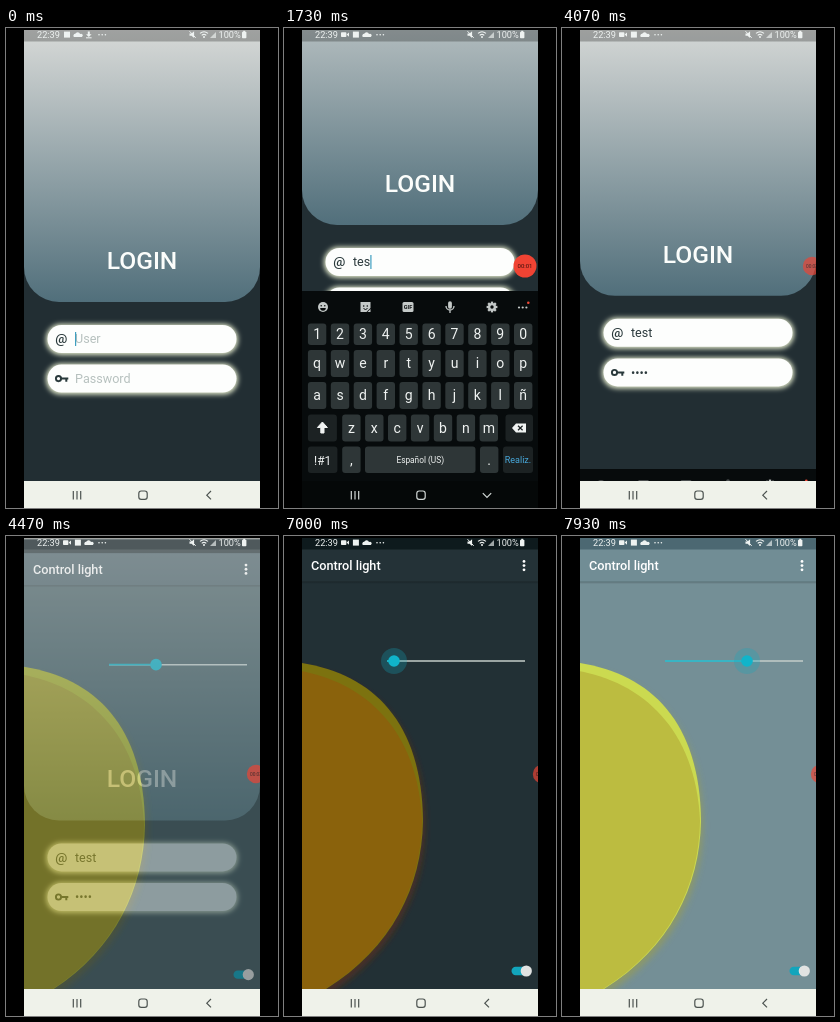
These frames come from a looping animation (272x480 px, 8000 ms). An HTML page:

```html
<!DOCTYPE html>
<html lang="es">
<head>
<meta charset="utf-8">
<title>Control light</title>
<style>
  html, body { margin: 0; width: 100%; height: 100%; overflow: hidden; background: #000; }
  svg { display: block; width: 100%; height: 100%; font-family: Roboto, sans-serif; }
</style>
</head>
<body>
<svg id="stage" viewBox="0 0 272 480"></svg>
<script>
const LOOP = 8000;
const stage = document.getElementById('stage');
const $ = id => document.getElementById(id);
const set = (id, attrs) => { for (const k in attrs) $(id).setAttribute(k, attrs[k]); };
const show = (id, on) => set(id, { visibility: on ? 'visible' : 'hidden' });
const clamp = x => Math.max(0, Math.min(1, x));

// ---------- markup helpers ----------
const rect = (x, y, w, h, fill, r = 0, more = '') =>
  `<rect x="${x}" y="${y}" width="${w}" height="${h}" rx="${r}" fill="${fill}" ${more}/>`;
const dot = (x, y, r, fill, more = '') => `<circle cx="${x}" cy="${y}" r="${r}" fill="${fill}" ${more}/>`;
const line = (d, color, w = 1, more = '') =>
  `<path d="${d}" fill="none" stroke="${color}" stroke-width="${w}" ${more}/>`;
const shape = (d, fill, more = '') => `<path d="${d}" fill="${fill}" ${more}/>`;
const text = (x, y, size, fill, str, more = '') =>
  `<text x="${x}" y="${y}" font-size="${size}" fill="${fill}" ${more}>${str}</text>`;
const at = (x, y, body, more = '') => `<g transform="translate(${x} ${y})" ${more}>${body}</g>`;
const MID = 'text-anchor="middle"';
const BOLD = 'font-weight="500"';

// ---------- login page ----------
const INK = '#29393b';
const keyIcon = dot(52.5, 0, 2.6, 'none', `stroke="${INK}" stroke-width="1.9"`) +
  line('M55 0H62.3M60.3 0V3.2', INK, 2);
const atIcon = text(55.3, 4.2, 13.5, INK, '@', `${MID} ${BOLD}`);

const field = (id, y, icon, hint) => at(0, y,
  rect(40, -15, 192, 31, '#e6edcf', 15, 'filter="url(#glow)"') +
  rect(41.5, -14, 189, 28, '#fdfefd', 14) + icon +
  text(69, 4.4, 12.6, '#b7c1bf', hint, `id="${id}Hint"`) +
  text(69, 4.4, 12.6, '#2b393c', '', `id="${id}Text"`) +
  rect(69, -7, 1.2, 14, '#3f9fc0', 0, `id="${id}Caret"`));

const login =
  rect(18, 0, 236, 453, '#222e33') +
  `<g id="scroll">` +
  shape('M18 -20H254V239A35 35 0 0 1 219 274H53A35 35 0 0 1 18 239Z', 'url(#sky)') +
  text(136, 240.8, 24.6, '#fbfdfb', 'LOGIN', `${MID} ${BOLD}`) +
  field('user', 311, atIcon, 'User') +
  field('pass', 350.6, keyIcon, 'Password') + `</g>` +
  rect(18, 0, 236, 13.5, '#000', 0, 'opacity=".26"');

// ---------- light page ----------
const SUN = 'M10 126C85 135 138 182 139 285C138 350 108 412 42 453H10Z';
const CORE = 'M10 134C76 143 134 190 138 285C137 350 107 412 41 453H10Z';
const light =
  rect(18, 0, 236, 600, '#435a5f', 0, 'id="wall"') +
  `<g filter="url(#soft)">${shape(SUN, '#8a6410', 'id="shade" opacity=".55" transform="translate(2 5)"')}</g>` +
  shape(SUN, '#aaac24', 'id="rim"') + shape(CORE, '#a39720', 'id="core" filter="url(#edge)"') +
  rect(18, 45, 236, 3, 'url(#drop)') +
  rect(18, 0, 236, 45.5, '#435a5f', 0, 'id="bar"') +
  rect(18, 0, 236, 13.5, '#18262a', 0, 'id="top"') +
  text(27, 34, 12.7, '#fff', 'Control light', BOLD) +
  [25.4, 29.6, 33.8].map(y => dot(240, y, 1.4, '#fff')).join('') +
  line('M103 125H241', '#c3cdc9', 1.5) +
  line('M103 125H145', '#12b2c6', 1.7, 'id="active"') +
  dot(145, 125, 13, '#12a9bd', 'id="halo"') + dot(145, 125, 5.8, '#10b4ca', 'id="thumb"') +
  rect(227.5, 430.8, 17, 8.4, '#12a5bc', 4.2) + dot(242.3, 435, 5.6, '#e1e3e2');

// ---------- keyboard ----------
const key = (x, y, w, h, label, o = {}) =>
  rect(x, y, w, h, o.fill || '#2e3637', 3, o.id ? `id="${o.id}"` : '') +
  text(x + w / 2, y + h / 2 + (o.dy || 4.8), o.size || 14, o.ink || '#f0f3f2', label, MID);
const row = (chars, x, y, h) => [...chars].map((c, i) =>
  key(x + i * 22.9, y, 18.4, h, c, { id: 'key-' + c })).join('');

const GREY = '#c4c9c8';
const gear = [0, 45, 90, 135].map(a => line('M0 -5.4V5.4', GREY, 2.3, `transform="rotate(${a})"`)).join('') +
  dot(0, 0, 4, GREY) + dot(0, 0, 1.7, '#080c0d');
const tools = `<g id="tools">` +
  at(39, 279, dot(0, 0, 5, GREY) + dot(-1.8, -1.3, .8, '#080c0d') + dot(1.8, -1.3, .8, '#080c0d') +
    shape('M-2.8 1H2.8A2.8 2.8 0 0 1 -2.8 1Z', '#080c0d')) +
  at(81.5, 279, shape('M-5 -5H5V1L1 5H-5Z', GREY) + dot(-1.8, -1, .8, '#080c0d') + dot(1.8, -1, .8, '#080c0d') +
    line('M-2 1.5Q0 3.5 2 1.5', '#080c0d') + shape('M2 5L5 2V5Z', GREY)) +
  at(124, 279, rect(-5.5, -5, 11, 10, GREY, 1.5) + text(0, 2, 5.5, '#080c0d', 'GIF', `${MID} font-weight="700"`)) +
  at(166, 279, rect(-1.9, -5.8, 3.8, 7.6, GREY, 1.9) + line('M-4 -1A4 4 0 0 0 4 -1M0 3V6', GREY, 1.3)) + `</g>` +
  at(208, 279, gear) +
  [235, 238.7, 242.4].map(x => dot(x, 279.5, 1.1, GREY)).join('') + dot(244.3, 274.8, 1.3, '#ef4836');

const DARK = { fill: '#1c2223' };
const keyboard = rect(18, 263, 236, 220, '#070b0c') + tools +
  row('1234567890', 23.9, 295.5, 21.5) +
  row('qwertyuiop', 23.9, 322, 27) +
  row('asdfghjklñ', 23.9, 354, 27) +
  key(23.9, 386.5, 29, 27, '', DARK) +
  line('M36.8 405V399.5H33.4L38.4 394L43.4 399.5H40V405Z', '#f0f3f2', 1, 'style="fill:#f0f3f2"') +
  row('zxcvbnm', 58.2, 386.5, 27) +
  key(221.5, 386.5, 27.5, 27, '', DARK) +
  shape('M228 400L232 395.5H242V404.5H232Z', '#f0f3f2') + line('M234 397.8L238.6 402.3M238.6 397.8L234 402.3', '#1c2223', 1.2) +
  key(23.9, 418.5, 29.5, 26.5, '!#1', { ...DARK, size: 12 }) +
  key(58.2, 418.5, 18.4, 26.5, ',') +
  key(81, 418.5, 110.5, 26.5, 'Español (US)', { size: 8.3, dy: 3 }) +
  key(196, 418.5, 18.4, 26.5, '.') +
  key(219, 418.5, 30, 26.5, 'Realiz.', { ...DARK, size: 9, dy: 3.2, ink: '#48a9dc', id: 'done' });

// ---------- system bars ----------
const PALE = '#eef2f1';
const square = rect(-3, -3, 6, 6, PALE);
const cloud = shape('M-4 2.4A1.9 1.9 0 0 1 -2.6 -.8A2.6 2.6 0 0 1 2.2 -.6A1.6 1.6 0 0 1 4 2.4Z', PALE);
const camera = rect(-4, -2.4, 5.4, 4.8, PALE, .8) + shape('M1.6 0L4 -2.2V2.2Z', PALE);
const download = shape('M-1 -3H1V-.4H2.8L0 2.3L-2.8 -.4H-1Z', PALE) + line('M-2.8 3.2H2.8', PALE);
const icons = list => list.map((body, i) => at(61 + i * 10.9, 6.6, body)).join('');
const status = text(31, 10, 9.2, PALE, '22:39') +
  `<g id="before">${icons([square, cloud, download])}</g><g id="after">${icons([camera, square, cloud])}</g>` +
  [93, 96.2, 99.4].map(x => dot(x, 6.8, .8, PALE)).join('') +
  at(186.5, 6.6, shape('M-3 -1.2H-1L1.6 -3.4V3.4L-1 1.2H-3Z', PALE) + line('M-3 -3.4L3.2 3.2', PALE)) +
  at(198, 6.6, line('M-4 -1.2Q0 -4.6 4 -1.2M-2.3 .8Q0 -1.2 2.3 .8', PALE, 1.1) + dot(0, 2.4, 1, PALE)) +
  shape('M204 10L210 4V10Z', PALE, 'opacity=".65"') +
  text(212.5, 10, 9.2, PALE, '100%') + rect(236, 3.8, 4.4, 6.4, PALE, .8) + rect(237.2, 2.8, 2, 1.4, PALE);

const nav = rect(18, 453, 236, 27, '#eff2ea', 0, 'id="navBack"') +
  `<g id="navInk" fill="none" stroke="#4c5350" stroke-width="1.2">` +
  `<path d="M67.3 463V471.5M71 463V471.5M74.7 463V471.5"/>` +
  `<rect x="132.8" y="463" width="8.4" height="8.4" rx="2.4"/>` +
  `<path id="back" d="M205 463L200.8 467.2L205 471.4"/><path id="down" d="M198.8 465.2L203 469.4L207.2 465.2"/></g>`;

const blur = (id, n) => `<filter id="${id}" x="-20%" y="-60%" width="140%" height="220%"><feGaussianBlur stdDeviation="${n}"/></filter>`;
stage.innerHTML = `<defs>
  <linearGradient id="sky" gradientUnits="userSpaceOnUse" x1="0" y1="0" x2="0" y2="274">
    <stop stop-color="#d8dad8"/><stop offset="1" stop-color="#516f7b"/></linearGradient>
  <linearGradient id="drop" x2="0" y2="1"><stop stop-color="#000" stop-opacity=".28"/><stop offset="1" stop-opacity="0"/></linearGradient>
  ${blur('glow', 2.6)}${blur('soft', 3)}${blur('edge', .7)}
  <clipPath id="screen"><rect x="18" y="2" width="236" height="478"/></clipPath>
  <clipPath id="app"><rect x="18" y="0" width="236" height="453"/></clipPath></defs>` +
  rect(0, 0, 272, 480, '#000') +
  `<g clip-path="url(#screen)"><g clip-path="url(#app)"><g>${login}</g><g id="light">${light}</g></g>` +
  `<g clip-path="url(#app)"><g id="keyboard">${keyboard}</g></g>${nav}${status}` +
  `<g id="rec">${dot(0, 0, 11.5, '#f04333')}${text(0, 2.2, 6, '#3a0e0a', '00:00', `${MID} id="clock"`)}</g></g>`;

// ---------- motion ----------
const ease = p => p * p * (3 - 2 * p);
function track(t, points) {
  if (t <= points[0][0]) return points[0][1];
  for (let i = 1; i < points.length; i++) {
    const [t0, a] = points[i - 1], [t1, b] = points[i];
    if (t <= t1) return a + (b - a) * ease((t - t0) / (t1 - t0));
  }
  return points[points.length - 1][1];
}

const LEVELS = [.05, .304, .594, 1];
const tones = {
  wall: [[34, 48, 53], [67, 90, 95], [116, 143, 150], [176, 190, 197]],
  bar: [[36, 50, 55], [67, 90, 97], [113, 141, 149], [172, 187, 194]],
  top: [[14, 26, 29], [24, 38, 42], [76, 104, 114], [128, 142, 148]],
  core: [[138, 98, 12], [163, 151, 32], [188, 188, 64], [240, 236, 110]],
  rim: [[124, 114, 15], [170, 172, 36], [203, 218, 80], [245, 248, 130]],
  shade: [[108, 50, 26], [112, 104, 34], [160, 160, 66], [205, 205, 110]]
};
function tone(name, v) {
  let i = 0;
  while (i < 2 && v > LEVELS[i + 1]) i++;
  const p = clamp((v - LEVELS[i]) / (LEVELS[i + 1] - LEVELS[i]));
  return `rgb(${tones[name][i].map((c, k) => Math.round(c + (tones[name][i + 1][k] - c) * p))})`;
}

const WORD = 'test';
const userTimes = [1130, 1370, 1610, 1880];
const passTimes = [2740, 2940, 3140, 3465];
const typed = (t, times) => times.filter(x => t >= x).length;
const FOCUS_PASS = 2180, DONE = 3800;

function fill(id, str, focused) {
  $(id + 'Text').textContent = str;
  show(id + 'Hint', !str);
  show(id + 'Caret', focused);
  if (focused) set(id + 'Caret', { x: 69 + (str ? $(id + 'Text').getComputedTextLength() : 0) });
}

function draw(t) {
  // typing
  const n = typed(t, passTimes);
  const hidden = t > passTimes[3] + 400 || (n === 3 && t > 3320);
  fill('user', WORD.slice(0, typed(t, userTimes)), t < FOCUS_PASS);
  fill('pass', n ? '•'.repeat(hidden ? n : n - 1) + (hidden ? '' : WORD[n - 1]) : '', t >= FOCUS_PASS && t < DONE);
  for (const c of new Set(WORD)) {
    const down = [userTimes, passTimes].some(times => times.some((x, i) => WORD[i] === c && t >= x - 70 && t < x));
    set('key-' + c, { fill: down ? '#596365' : '#2e3637' });
  }
  set('done', { fill: t > 3730 && t < 3830 ? '#3d4647' : '#1c2223' });

  // scrolling and keyboard
  const scroll = track(t, [[70, 0], [420, 77], [FOCUS_PASS, 77], [2400, 117], [DONE, 117], [4150, -10.4]]);
  set('scroll', { transform: `translate(0 ${-scroll})` });
  const rise = track(t, [[70, 0], [400, 1], [DONE, 1], [4120, 0]]);
  set('keyboard', { transform: `translate(0 ${190 * (1 - rise)})` });
  show('keyboard', rise > 0);
  set('tools', { opacity: t < FOCUS_PASS ? 1 : .35 });
  const open = t >= 100 && t < 4050;
  set('navBack', { fill: open ? '#050808' : '#eff2ea' });
  set('navInk', { stroke: open ? '#d2d8d6' : '#4c5350' });
  show('back', !open);
  show('down', open);

  // page change
  const p = clamp((t - 4245) / 300);
  set('light', { opacity: p ** 1.7, transform: `translate(0 ${120 * (1 - p) ** 2.5})` });
  show('light', p > 0);

  // slider and lamp
  const x = track(t, [[4600, 150], [5330, 139], [5730, 139], [5870, 145], [6300, 172], [7000, 110], [7400, 124], [7930, 185]]);
  const v = (x - 103) / 138;
  for (const id in tones) set(id, { fill: tone(id, v) });
  set('thumb', { cx: x });
  set('active', { d: `M103 125H${x}` });
  const grip = track(t, [[4600, 0], [4700, 1], [5330, 1], [5430, 0], [5700, 0], [5830, 1]]);
  set('halo', { cx: x, r: 6 + 7 * grip, opacity: .28 * grip });

  // recorder badge
  const on = t >= 500;
  show('rec', on);
  show('after', on);
  show('before', !on);
  const tuck = track(t, [[2500, 241], [2750, 250], [4600, 250], [4900, 258]]);
  const size = track(t, [[500, .5], [650, 1], [2500, 1], [2750, .8]]);
  set('rec', {
    transform: `translate(${tuck} 238) scale(${size})`,
    opacity: track(t, [[500, .3], [650, 1], [2500, 1], [2750, .68]])
  });
  $('clock').textContent = '00:0' + Math.max(0, Math.floor((t - 600) / 1000));
}

const start = performance.now();
function frame() {
  draw((performance.now() - start) % LOOP);
  requestAnimationFrame(frame);
}
frame();
</script>
</body>
</html>
```
